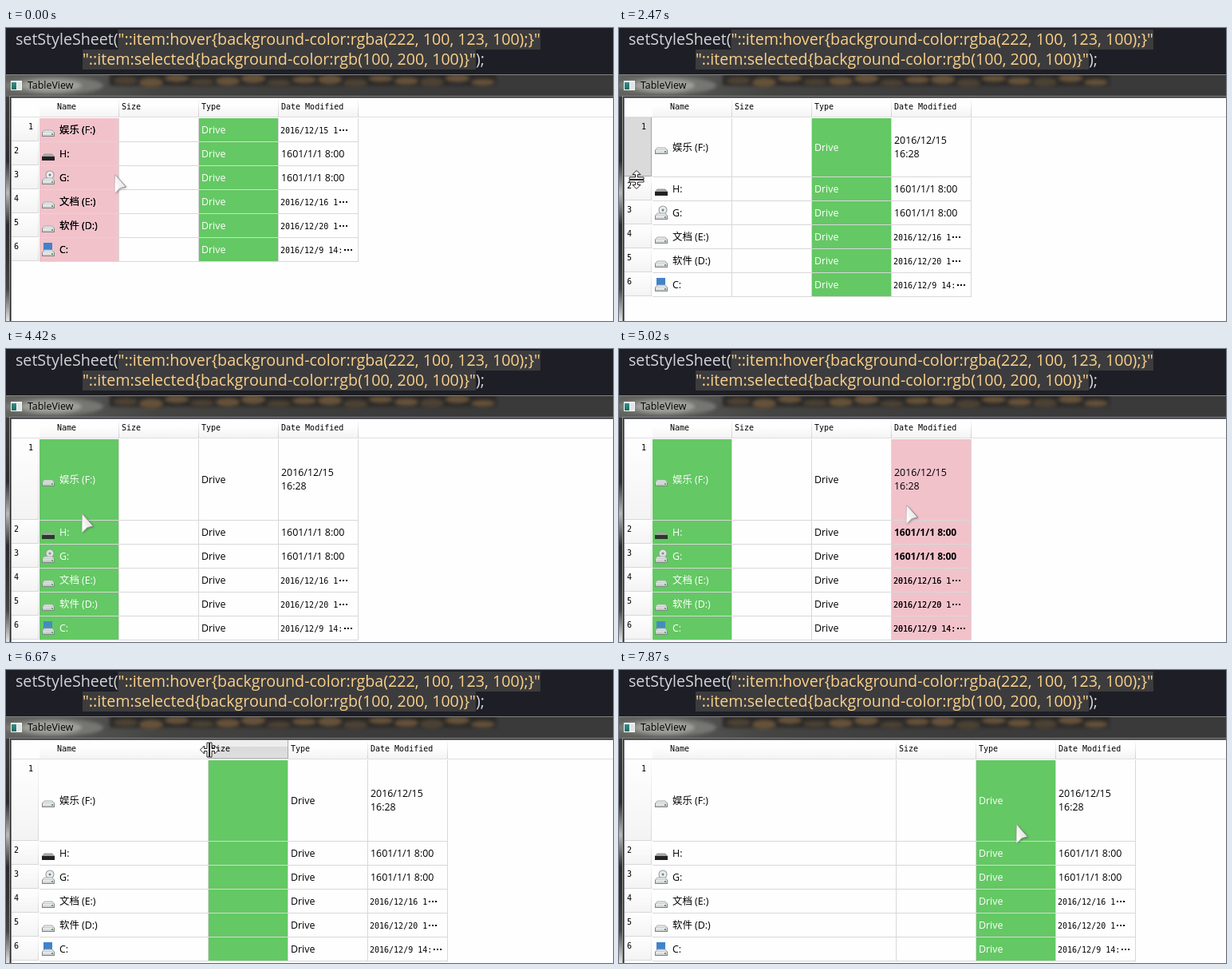
These frames come from a looping animation (761 px wide and 367 px high, 8 s). An HTML page with a canvas:

```html
<!DOCTYPE html>
<html lang="en">
<head>
<meta charset="utf-8">
<title>TableView</title>
<style>
html, body { margin: 0; width: 100%; height: 100%; overflow: hidden; background: #fff; }
canvas { display: block; }
</style>
</head>
<body>
<canvas id="stage" width="761" height="367"></canvas>
<script>
const ctx = document.getElementById('stage').getContext('2d');
const LOOP = 8000;
const FONTS = '"Open Sans", "Noto Sans CJK SC", "Noto Sans CJK", sans-serif';
const CODE = '19.65px ' + FONTS;
const UI = '12.4px ' + FONTS;
const BOLD = 'bold 12px ' + FONTS;
const MONO = '10px "DejaVu Sans Mono", monospace';
const GREEN = 'rgb(100,200,100)';
const PINK = 'rgba(222,100,123,0.392)';
const GRID = '#d8d8d8';
const HEADS = ['Name', 'Size', 'Type', 'Date Modified'];
const ROWS = [
  ['娱乐 (F:)', '2016/12/15 1', 'disk'],
  ['H:', '1601/1/1 8:00', 'dark'],
  ['G:', '1601/1/1 8:00', 'disc'],
  ['文档 (E:)', '2016/12/16 1', 'disk'],
  ['软件 (D:)', '2016/12/20 1', 'disk'],
  ['C:', '2016/12/9 14:', 'system']
];

// pointer path: time, x, y
const PATH = [
  [0, 136, 183], [120, 150, 185], [570, 360, 190], [720, 375, 188],
  [1110, 125, 172], [1560, 60, 152], [1710, 28, 146], [2010, 22, 146],
  [2320, 22, 160], [2470, 22, 190], [2620, 22, 210], [2770, 22, 218],
  [2920, 60, 214], [3370, 372, 200], [3670, 380, 199], [3820, 374, 202],
  [4270, 100, 206], [4420, 95, 206], [4570, 105, 205], [5020, 360, 195],
  [5170, 352, 190], [5470, 215, 160], [5620, 195, 150], [5920, 146, 109],
  [6070, 144, 100], [6370, 143, 99], [6520, 160, 99], [6820, 349, 100],
  [6970, 240, 160], [7120, 180, 189], [7270, 230, 190], [7570, 490, 193],
  [7870, 498, 193]
];

function rect(x, y, w, h, fill) {
  ctx.fillStyle = fill;
  ctx.fillRect(x, y, w, h);
}

function text(str, x, y, font, fill = '#000') {
  ctx.font = font;
  ctx.fillStyle = fill;
  ctx.fillText(str, x, y);
}

function shade(x0, y0, x1, y1, ...stops) {
  const g = ctx.createLinearGradient(x0, y0, x1, y1);
  stops.forEach((c, i) => g.addColorStop(i / (stops.length - 1), c));
  return g;
}

function poly(points, fill, stroke) {
  ctx.beginPath();
  points.forEach(([x, y]) => ctx.lineTo(x, y));
  ctx.closePath();
  if (fill) { ctx.fillStyle = fill; ctx.fill(); }
  if (stroke) { ctx.strokeStyle = stroke; ctx.stroke(); }
}

function oval(x, y, rx, ry, fill) {
  ctx.beginPath();
  ctx.ellipse(x, y, rx, ry, 0, 0, Math.PI * 2);
  ctx.fillStyle = fill;
  ctx.fill();
}

// screen updates come every 150 ms, with two irregular pauses
function snap(t) {
  const every = from => from + 150 * Math.floor((t - from) / 150);
  if (t < 120) return 0;
  if (t < 1110) return every(120);
  if (t < 2320) return Math.min(2010, every(1110));
  return Math.min(7870, every(2320));
}

function pointerAt(t) {
  const i = PATH.findIndex(p => p[0] > t);
  if (i < 0) return PATH[PATH.length - 1].slice(1);
  const [t0, x0, y0] = PATH[i - 1], [t1, x1, y1] = PATH[i];
  const k = (t - t0) / (t1 - t0);
  return [x0 + (x1 - x0) * k, y0 + (y1 - y0) * k];
}

function stateAt(t) {
  const [x, y] = pointerAt(t).map(Math.round);
  const s = { x, y, selected: 2, cursor: 'arrow', tall: 30, wide: 100 };
  if (t >= 4270) s.selected = 0;
  if (t >= 5620) s.selected = 1;
  if (t >= 6970) s.selected = 0;
  if (t >= 7720) s.selected = 2;
  if (t >= 1710 && t <= 2770) s.cursor = 'rows';
  if (t >= 6070 && t <= 6820) s.cursor = 'cols';
  if (t >= 2320) s.tall = t < 2770 ? y - 116 : 102;
  if (t >= 6520) s.wide = t < 6820 ? x - 43 : 306;
  s.left = i => 42 + (i ? s.wide + 100 * (i - 1) : 0);
  s.top = i => 113 + (i ? s.tall + 30 * (i - 1) : 0);
  const col = [3, 2, 1, 0].find(i => x >= s.left(i));
  s.hoverHead = y < 112 ? col : -1;
  s.hoverRow = x < 42 ? (s.cursor === 'rows' ? 0 : ROWS.findIndex((r, i) => y < s.top(i + 1))) : -1;
  s.hover = y >= 112 && x >= 42 && x < s.left(4) ? col : -1;
  return s;
}

function drawCode() {
  const sand = '#fbd089', plain = '#d4d4d8';
  rect(0, 0, 761, 58, '#1e1e26');
  const lines = [
    [12, 21, 'setStyleSheet(', '"::item:hover{background-color:rgba(222, 100, 123, 100);}"', ''],
    [96, 46, '', '"::item:selected{background-color:rgb(100, 200, 100)}"', ');']
  ];
  for (const [x, y, before, str, after] of lines) {
    ctx.font = CODE;
    const from = x + ctx.measureText(before).width;
    const width = ctx.measureText(str).width;
    rect(from, y - 19, width, 25, '#3c3c3e');
    text(before, x, y, CODE, plain);
    text(str, from, y, CODE, sand);
    text(after, from + width, y, CODE, plain);
  }
}

function drawTitleBar() {
  rect(0, 57, 761, 1, '#1a1a1c');
  rect(0, 58, 761, 28, shade(0, 0, 761, 0, '#62625f', '#444443', '#3d3d3d', '#3a3a3b', '#3a3a3b'));
  ctx.save();
  ctx.beginPath();
  ctx.rect(0, 58, 761, 28);
  ctx.clip();
  ctx.filter = 'blur(2px)';
  rect(130, 57, 485, 15, '#2c2a28');
  for (let i = 0; i < 15; i++) {
    oval(150 + i * 32, 66 + 3 * Math.sin(i * 2.3), 15, 5 + Math.sin(i * 1.7), i % 3 ? '#66523a' : '#4c4234');
  }
  oval(60, 72, 62, 11, 'rgba(135,135,130,0.7)');
  oval(57, 72, 38, 8, 'rgba(170,170,165,0.8)');
  ctx.restore();
  rect(0, 58, 761, 1, '#858585');

  rect(6, 66, 14, 12, '#f4f6f6');
  rect(7, 68, 6, 9, shade(0, 68, 0, 77, '#2d8f91', '#276a58'));
  rect(14, 68, 5, 9, '#dfe6e6');
  text('TableView', 27, 76, UI);
}

function drawWindow() {
  drawTitleBar();
  rect(0, 86, 5, 281, shade(0, 86, 0, 367, '#3a3a3c', '#333', '#2c2c2e', '#b8b8b8', '#2b2b2d', '#333', '#444', '#e4e4e4'));
  rect(4, 85, 757, 1, '#8a8a8a');
  rect(4, 85, 1, 282, '#9a9a9a');
  rect(5, 86, 756, 1, '#262626');
  rect(5, 86, 1, 281, '#262626');
  rect(6, 87, 755, 280, '#828790');
  rect(7, 88, 754, 279, '#fefefe');
}

function drawHeads(s) {
  rect(7, 111, 754, 1, '#dedede');
  HEADS.forEach((name, i) => {
    const x = s.left(i), w = s.left(i + 1) - x, hot = s.hoverHead === i;
    if (hot) {
      rect(x, 88, w, 8, '#ededee');
      rect(x, 96, w, 15, shade(0, 96, 0, 111, '#d9d9da', '#dfdfe0'));
      rect(x, 110, w, 1, '#b5b5b7');
      rect(x + w - 1, 88, 1, 23, '#a9a9ab');
    } else {
      rect(x, 98, w, 13, shade(0, 98, 0, 111, '#fdfdfd', '#f4f4f5'));
      rect(x + w - 1, 90, 1, 21, shade(0, 90, 0, 111, '#f6f6f6', '#cfcfcf'));
    }
    text(name, i ? x + 3 : 64, 102, MONO);
  });
}

function drawRowHeads(s) {
  ROWS.forEach((r, i) => {
    const y = s.top(i) - 1, h = s.top(i + 1) - 1 - y, hot = s.hoverRow === i;
    rect(7, y, 34, h, hot ? '#dadadb' : shade(0, y, 0, y + h, '#fefefe', '#f9f9fa', '#f3f3f4'));
    rect(7, y + h - 1, 34, 1, hot ? '#a5a5a8' : GRID);
    rect(40, y, 1, h, hot ? '#a5a5a8' : shade(0, y, 0, y + h, '#f8f8f8', '#d6d6d7'));
    text(i + 1, i ? 10 : 28, y + 15, MONO);
  });
}

function drawIcon(kind, x, y) {
  const dark = kind === 'dark';
  if (kind === 'disc') {
    oval(x + 10, y - 4, 5.5, 5.5, '#8f9498');
    oval(x + 10, y - 4, 4.5, 4.5, '#e9eeee');
    oval(x + 10, y - 4, 1.5, 1.5, '#777e83');
  }
  if (kind === 'system') rect(x + 2, y - 9, 11, 10, '#3f83c9');
  poly([[x + 3, y], [x + 13, y], [x + 15.5, y + 3], [x + 0.5, y + 3]],
    dark ? '#aaa' : '#eceeef', dark ? '#999' : '#a5a8aa');
  rect(x, y + 3, 16, 5, dark ? '#222' : '#7f8386');
  if (dark) return;
  rect(x + 1, y + 3, 14, 4, shade(0, y + 3, 0, y + 7, '#f1f2f3', '#c8cbcd'));
  rect(x + 12, y + 4, 2, 2, '#54a552');
}

function drawDots(x, y, fill) {
  for (let i = 0; i < 3; i++) rect(x + 1 + i * 4, y, 2, 2, fill);
}

function drawDate(i, x, mid, tall, ink, hot) {
  const str = ROWS[i][1];
  if (i === 0 && tall > 48) {
    text('2016/12/15', x + 3, mid - 5, UI, ink);
    text('16:28', x + 3, mid + 12, UI, ink);
  } else if (i === 1 || i === 2) {
    text(str, x + 3, mid + 4, hot ? BOLD : UI, ink);
  } else {
    text(str, x + 2, mid + 4, MONO, ink);
    if (hot) text(str, x + 2, mid + 4, MONO, ink);
    drawDots(x + 3 + str.length * 6, mid - 1, ink);
  }
}

function drawCells(s) {
  ROWS.forEach(([name, , icon], i) => {
    const y = s.top(i), h = s.top(i + 1) - y, mid = Math.round(y + h / 2);
    for (let c = 0; c < 4; c++) {
      const x = s.left(c), w = s.left(c + 1) - x;
      const on = s.selected === c, hot = s.hover === c && !on;
      const ink = on ? '#fff' : '#000';
      if (on) rect(x, y, w - 1, h - 1, GREEN);
      if (hot) rect(x, y, w - 1, h - 1, PINK);
      rect(x, y + h - 1, w, 1, GRID);
      rect(x + w - 1, y, 1, h, GRID);
      if (c === 0) {
        ctx.globalAlpha = on ? 0.85 : 1;
        drawIcon(icon, x + 3, mid);
        ctx.globalAlpha = 1;
      }
      for (let pass = 0; pass < (hot ? 2 : 1); pass++) {
        if (c === 0) text(name, x + 25, mid + 4, UI, ink);
        if (c === 2) text('Drive', x + 3, mid + 4, UI, ink);
      }
      if (c === 3) drawDate(i, x, mid, h, ink, hot);
    }
  });
}

function drawCursor({ x, y, cursor }) {
  ctx.save();
  ctx.translate(x, y);
  ctx.lineWidth = 1;
  if (cursor === 'arrow') {
    ctx.shadowColor = 'rgba(0,0,0,0.4)';
    ctx.shadowBlur = 3;
    ctx.shadowOffsetX = ctx.shadowOffsetY = 1;
    const shape = [[0.5, 0.5], [14.5, 16], [7, 17.5], [0.5, 23.5]];
    poly(shape, shade(0, 12, 10, 8, 'rgba(255,255,255,0.98)', 'rgba(240,240,240,0.9)'));
    ctx.shadowColor = 'transparent';
    poly(shape, null, shade(0, 12, 10, 8, 'rgba(215,212,214,0.8)', 'rgba(120,116,118,0.85)'));
  } else {
    if (cursor === 'cols') ctx.rotate(Math.PI / 2);
    for (const dir of [-1, 1]) {
      ctx.save();
      ctx.scale(1, dir);
      poly([[-9, 0.5], [9, 0.5], [9, 3], [1.5, 3], [1.5, 6.5], [5, 6.5], [0, 11.5],
        [-5, 6.5], [-1.5, 6.5], [-1.5, 3], [-9, 3]], '#fff', '#222');
      ctx.restore();
    }
  }
  ctx.restore();
}

function draw(now) {
  const s = stateAt(snap(now % LOOP));
  drawCode();
  drawWindow();
  drawHeads(s);
  drawRowHeads(s);
  drawCells(s);
  drawCursor(s);
}

const start = performance.now();
function tick() {
  draw(performance.now() - start);
  requestAnimationFrame(tick);
}
tick();
</script>
</body>
</html>
```
